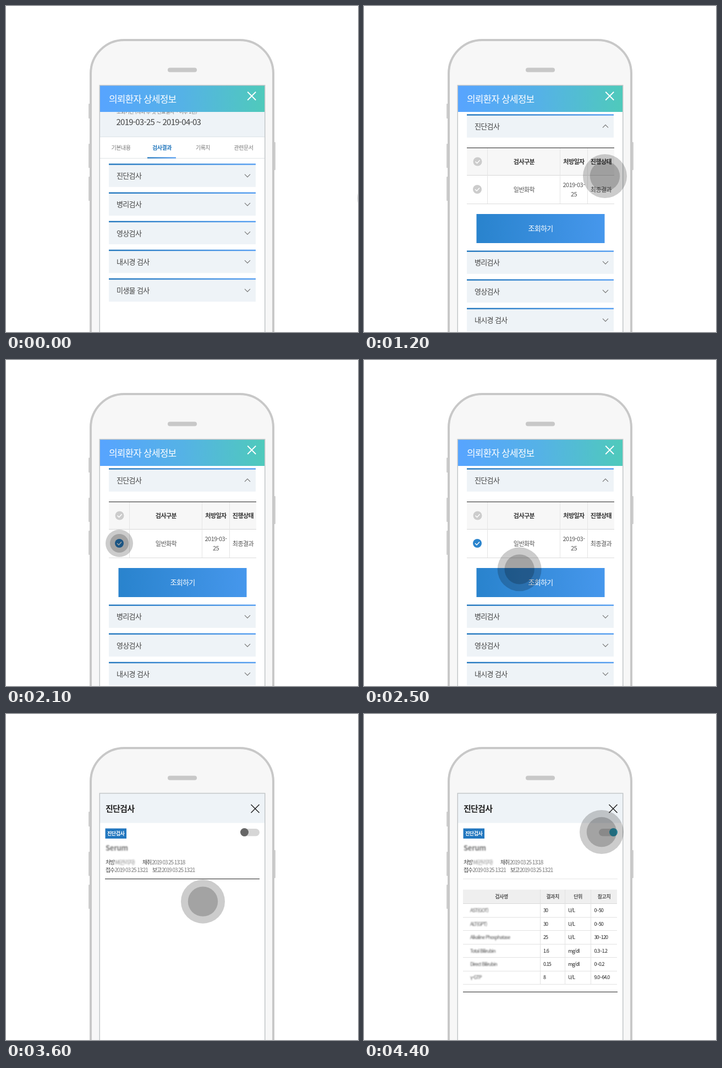
An HTML page that plays this animation: 640 by 594 pixels, repeating every 6400 ms.

```html
<!DOCTYPE html>
<html lang="ko">
<head>
<meta charset="utf-8">
<style>
html, body { margin: 0; width: 100%; height: 100%; overflow: hidden; background: #fff; }
svg { display: block; }
text { font-family: "Noto Sans CJK KR", "Noto Sans CJK", "Noto Sans CJK JP", sans-serif; white-space: pre; }
.blur { filter: blur(1px); }
</style>
</head>
<body>
<svg id="stage" width="640" height="594" viewBox="0 0 640 594"></svg>
<script>
const LOOP = 6400, STEP = 100;
const SCROLL = 90, OPEN = 196.2, TABLE = 206;

// ---- drawing helpers ----
const text = (x, cy, size, str, { fill = '#444', weight = 400, anchor = 'start', gap = -0.05, cls = '' } = {}) =>
  `<text x="${x}" y="${cy + size * 0.37}" font-size="${size}" fill="${fill}" font-weight="${weight}"
    text-anchor="${anchor}" letter-spacing="${gap * size}" class="${cls}">${str}</text>`;
const mid = (x, cy, size, str, o = {}) => text(x, cy, size, str, { ...o, anchor: 'middle' });
const rect = (x, y, w, h, fill, rx = 0) =>
  `<rect x="${x}" y="${y}" width="${w}" height="${h}" fill="${fill}" rx="${rx}"/>`;
const stroke = (d, color, width = 1, extra = '') =>
  `<path d="${d}" fill="none" stroke="${color}" stroke-width="${width}" ${extra}/>`;
const hline = (x, y, w, color) => rect(x, y, w, 1, color);
const vline = (x, y, h, color) => rect(x, y, 1, h, color);
const cross = (x, y, r, color, width) =>
  stroke(`M${x - r} ${y - r}L${x + r} ${y + r}M${x + r} ${y - r}L${x - r} ${y + r}`, color, width);
const gradient = (id, ...colors) => `<linearGradient id="${id}">` + colors.map((c, i) =>
  `<stop offset="${i / (colors.length - 1)}" stop-color="${c}"/>`).join('') + '</linearGradient>';
const check = (x, y, id = '') =>
  `<circle id="${id}" cx="${x}" cy="${y}" r="8" fill="#ccc"/>` +
  stroke(`M${x - 4} ${y}l3 3l5 -5.5`, '#fff', 1.5);

const card = (i, label, id) => {
  const y = 287.2 + i * 52.25;
  return rect(187, y, 267, 42.5, '#eef3f7') + rect(187, y, 267, 2.4, 'url(#bar)') +
    text(201, y + 22, 13, label) +
    `<g transform="translate(439 ${y + 22})"><path id="${id}" d="M-5 -2.5L0 2.5L5 -2.5" fill="none" stroke="#777" stroke-width="1.2"/></g>`;
};

// ---- parts ----
function phone() {
  const gray = '#c8c8c8';
  return [[150, 178, 27], [150, 251, 44], [150, 311, 44], [486, 248, 51]]
    .map(([x, y, h]) => rect(x, y, 4, h, '#d0d0d0', 1)).join('') +
    `<rect x="154" y="62" width="332" height="640" rx="61" fill="#f7f7f7" stroke="${gray}" stroke-width="4"/>` +
    rect(294, 112.5, 53, 8, gray, 4) + rect(170, 144, 301, 460, '#fff');
}

function orderTable() {
  const bold = { weight: 700, fill: '#333' }, plain = { fill: '#555' };
  return rect(187, 348, 268, 50, '#f7f7f7') + hline(187, 348, 268, '#222') +
    hline(187, 398, 268, '#d8d8d8') + hline(187, 450, 268, '#dcdcdc') +
    [224, 356, 406].map(x => vline(x, 349, 101, '#e4e4e4')).join('') +
    check(206.5, 373.5) + check(206, 424, 'pick') +
    mid(291, 374, 11, '검사구분', bold) + mid(381.5, 374, 11, '처방일자', bold) + mid(431, 374, 11, '진행상태', bold) +
    mid(291, 424.5, 11, '일반화학', plain) + mid(381.5, 416, 11, '2019-03-', plain) +
    mid(381.5, 433, 11, '25', plain) + mid(431, 424.5, 11, '최종결과', plain) +
    rect(204.5, 469, 233, 53, 'url(#button)') +
    mid(321, 495.5, 13, '조회하기', { fill: '#fff', weight: 500 });
}

function listPage() {
  const tab = { fill: '#777', weight: 500 };
  return `<g id="list"><g clip-path="url(#view)"><g id="scroll">` +
    rect(171, 140, 299, 98, '#eef3f7') + hline(171, 238, 299, '#dde3e7') +
    text(201, 192.5, 9, '조회기간 (의뢰 후 첫 진료일자 ~ 이후 1년)', { fill: '#777' }) +
    text(200.5, 211, 15, '2019-03-25 ~ 2019-04-03') +
    mid(209, 258, 10, '기본내용', tab) +
    mid(283.5, 258, 10, '검사결과', { fill: '#1f75bc', weight: 700 }) +
    mid(358, 258, 10, '기록지', tab) + mid(432, 258, 10, '관련문서', tab) +
    hline(171, 277, 299, '#dfe3e6') + rect(257, 275.5, 52, 2.2, 'url(#bar)') +
    card(0, '진단검사', 'arrow') +
    `<g clip-path="url(#fold)">${orderTable()}</g><g id="rest">` +
    ['병리검사', '영상검사', '내시경 검사', '미생물 검사'].map((s, i) => card(i + 1, s, '')).join('') +
    `</g></g></g>` + rect(171, 145, 299, 48, 'url(#head)') +
    text(187, 169.5, 17, '의뢰환자 상세정보', { fill: '#fff', weight: 500 }) +
    cross(446.7, 164, 7.5, '#fff', 1.8) + `</g>`;
}

function resultTable() {
  const head = { weight: 700, fill: '#555' }, cell = { weight: 500, fill: '#222', gap: -0.1 };
  const rows = [
    ['AST(GOT)', '30', 'U/L', '0~50'],
    ['ALT(GPT)', '30', 'U/L', '0~50'],
    ['Alkaline Phosphatase', '25', 'U/L', '30~120'],
    ['Total Bilirubin', '1.6', 'mg/dl', '0.3~1.2'],
    ['Direct Bilirubin', '0.15', 'mg/dl', '0~0.2'],
    ['γ-GTP', '8', 'U/L', '9.0~64.0']];
  return rect(180, 320, 280, 25, '#efefef') + hline(180, 345, 280, '#d8d8d8') +
    [320, 365, 412].map(x => vline(x, 320, 172, '#e2e2e2')).join('') +
    mid(250, 332.5, 9, '검사명', head) + mid(343, 332.5, 9, '결과치', head) +
    mid(389, 332.5, 9, '단위', head) + mid(436.5, 332.5, 9, '참고치', head) +
    rows.map(([name, value, unit, range], i) => {
      const y = 358 + i * 24.4;
      return text(193, y, 9, name, { ...cell, fill: '#555', cls: 'blur' }) +
        text(326, y, 9, value, cell) + text(371, y, 9, unit, cell) + text(418.5, y, 9, range, cell) +
        hline(180, Math.round(y + 12), 280, '#e2e2e2');
    }).join('');
}

function resultPage() {
  const label = { fill: '#444', gap: -0.11 }, date = { fill: '#777', gap: -0.11 };
  return `<g id="result">` + rect(171, 145, 299, 53.5, '#eef3f7') +
    text(181, 172.5, 15, '진단검사', { fill: '#222', weight: 700 }) + cross(453, 172.5, 7.5, '#222', 1.5) +
    rect(180.5, 208.5, 38.5, 18.5, '#2277bf') + text(184, 218, 9, '진단검사', { fill: '#fff', weight: 700 }) +
    rect(427, 209, 34, 13.5, '#d6d6d6', 6.75) + `<circle id="knob" cy="215.5" r="7.5"/>` +
    text(181, 244.5, 13, 'Serum', { fill: '#777', weight: 700, gap: -0.02, cls: 'blur' }) +
    text(181, 270, 10, '처방', label) + text(198, 270, 10, 'M(관리자)', { ...date, fill: '#888', cls: 'blur' }) +
    text(248, 270, 10, '채취', label) + text(265, 270, 10, '2019 03 25 13:18', date) +
    text(181, 284, 10, '접수', label) + text(197.5, 284, 10, '2019 03 25 13:21', date) +
    text(266, 284, 10, '보고', label) + text(283, 284, 10, '2019 03 25 13:21', date) +
    hline(180, 300, 281, '#e6e6e6') +
    `<g clip-path="url(#sheet)">${resultTable()}</g><g id="end">${hline(180, 300, 281, '#222')}</g></g>`;
}

const stage = document.getElementById('stage');
stage.innerHTML = `<defs>
  ${gradient('head', '#57a4ff', '#55b2e6', '#4fcabb')}
  ${gradient('bar', '#2277bd', '#569ff2')}
  ${gradient('button', '#2983cd', '#4697ec')}
  <clipPath id="view">${rect(171, 193, 299, 401)}</clipPath>
  <clipPath id="fold"><rect id="foldBox" x="171" y="330" width="299"/></clipPath>
  <clipPath id="sheet"><rect id="sheetBox" x="171" y="300" width="299"/></clipPath>
</defs>` + phone() + listPage() + resultPage() +
  `<rect x="170.25" y="144.5" width="300.5" height="470" fill="none" stroke="#c2c6c8" stroke-width="1.5"/>
  <circle id="outer" fill-opacity=".2"/><circle id="inner" fill-opacity=".2"/>`;

// ---- motion ----
// time, x, y of the touch point
const PATH = [
  [400, 679, 350], [700, 438, 310], [1600, 438, 310], [2000, 206, 334],
  [2300, 206, 334], [2600, 321, 405], [3500, 321, 405], [3800, 432, 215], [LOOP, 432, 215]];
const TAPS = [800, 2100, 2800, 4000];

const $ = id => document.getElementById(id);
const ramp = (t, a, b) => Math.min(1, Math.max(0, (t - a) / (b - a)));
const set = (id, attrs) => { for (const k in attrs) $(id).setAttribute(k, attrs[k]); };

function touchAt(t) {
  const i = Math.max(1, PATH.findIndex(p => p[0] >= t));
  const [t0, x0, y0] = PATH[i - 1], [t1, x1, y1] = PATH[i];
  const k = ramp(t, t0, t1);
  const down = TAPS.some(tap => t >= tap && t < tap + 200);
  return { cx: x0 + (x1 - x0) * k, cy: y0 + (y1 - y0) * k, r: down ? 25 : 40 };
}

function draw(t) {
  const open = ramp(t, 1000, 1200), shown = ramp(t, 4200, 4400);
  const second = t >= 3100, on = t >= 4000;
  set('list', { display: second ? 'none' : 'inline' });
  set('result', { display: second ? 'inline' : 'none' });
  set('scroll', { transform: `translate(0 ${-SCROLL * open})` });
  set('rest', { transform: `translate(0 ${OPEN * open})` });
  set('foldBox', { height: OPEN * open });
  set('arrow', { transform: t >= 800 ? 'scale(1 -1)' : 'scale(1 1)' });
  set('pick', { fill: t >= 2100 ? '#2a84cd' : '#ccc' });
  set('knob', { cx: on ? 453.5 : 433.5, fill: on ? '#33a9c4' : '#666' });
  set('sheetBox', { height: TABLE * shown });
  set('end', { transform: `translate(0 ${TABLE * shown})` });
  const touch = touchAt(t);
  set('outer', touch);
  set('inner', { ...touch, r: touch.r * 0.68 });
}

const start = performance.now();
function tick() {
  const t = (performance.now() - start) % LOOP;
  draw(Math.floor(t / STEP) * STEP);
  requestAnimationFrame(tick);
}
tick();
</script>
</body>
</html>
```
